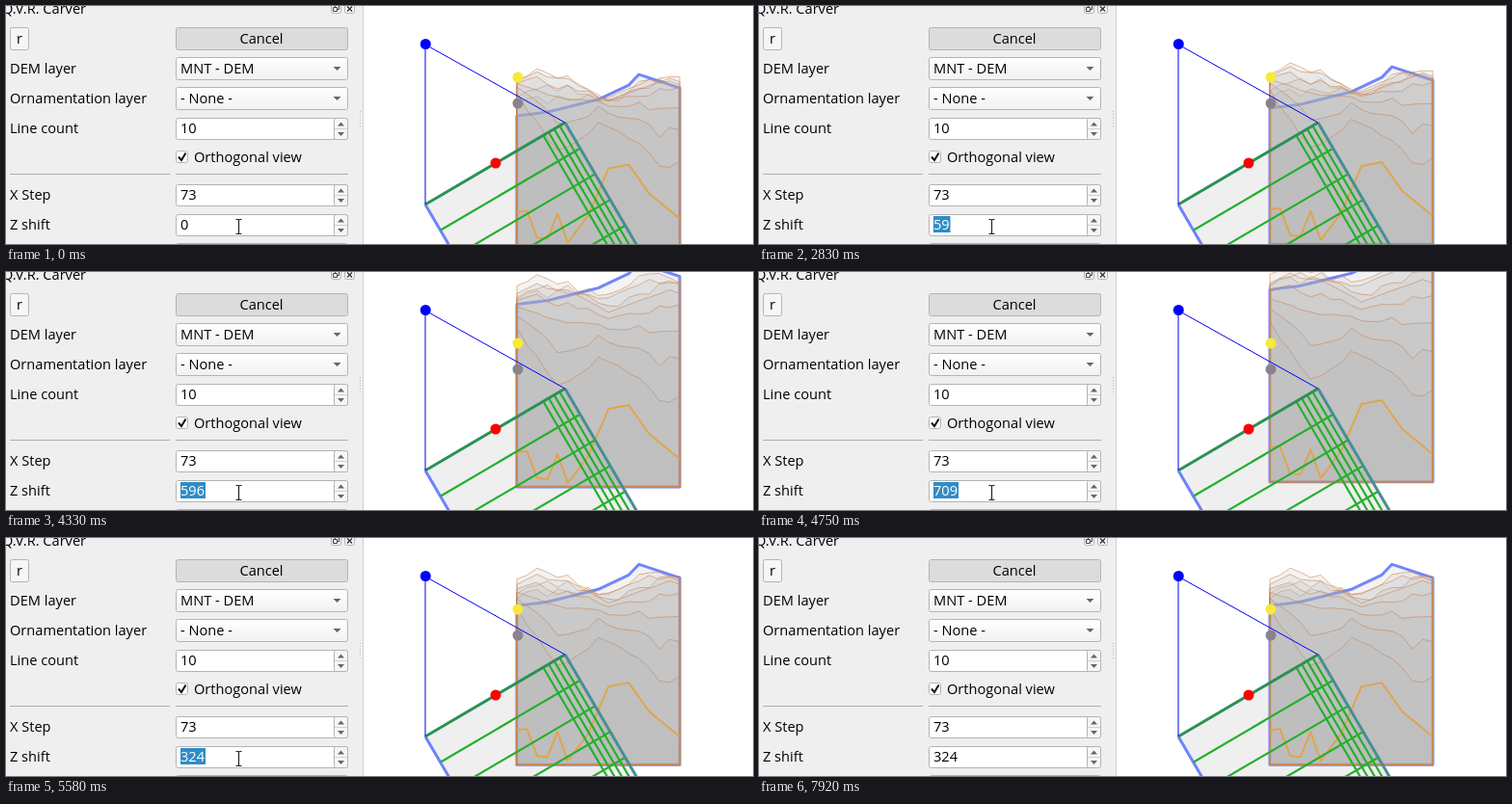
An HTML page for the animation above (8000 ms loop, 775 by 247 pixels).

```html
<!DOCTYPE html>
<html lang="en">
<head>
<meta charset="utf-8">
<title>Terrain profile panel</title>
<style>
html, body { margin: 0; width: 100%; height: 100%; overflow: hidden; background: #fff; }
svg { display: block; width: 775px; height: 247px; }
text { font: 14.6px "Open Sans", "Noto Sans", sans-serif; fill: #000; white-space: pre; }
.box { fill: #fff; stroke: #b4b4b4; }
.btn { fill: #f6f6f6; stroke: #b4b4b4; }
.rule { stroke: #adadad; fill: none; }
.tri { fill: #666; }
.profile { fill: rgba(177,177,177,.15); stroke: rgba(200,128,78,.55); stroke-linejoin: round; }
.green { stroke: #24b02c; stroke-width: 2.2; fill: none; }
.blue { stroke: #6e82ff; stroke-width: 3; fill: none; stroke-linejoin: round; }
.thin { stroke: #0000f5; stroke-width: 1; fill: none; }
</style>
</head>
<body>
<svg id="stage" viewBox="0 0 775 247">
  <defs><linearGradient id="face" x2="0" y2="1">
    <stop stop-color="#fff"/><stop offset="1" stop-color="#f1f1f1"/>
  </linearGradient></defs>
  <g id="map"></g>
  <g id="panel"></g>
</svg>
<script>
const LOOP = 8000;
const map = document.getElementById('map');
const panel = document.getElementById('panel');

function add(parent, tag, attrs, text) {
  const el = document.createElementNS('http://www.w3.org/2000/svg', tag);
  for (const k in attrs) el.setAttribute(k, attrs[k]);
  if (text !== undefined) el.textContent = text;
  parent.appendChild(el);
  return el;
}
const path = (parent, d, cls, more) => add(parent, 'path', { d, class: cls, ...more });
const label = (x, y, s, more) => add(panel, 'text', { x, y, ...more }, s);
const rect = (x, y, width, height, cls, more) =>
  add(panel, 'rect', { x, y, width, height, class: cls, rx: 2, ...more });

// Linear interpolation through [position, value] keys
function sample(keys, x) {
  const i = Math.max(1, keys.findIndex(k => k[0] >= x));
  const [x0, y0] = keys[i - 1], [x1, y1] = keys[i];
  return y0 + (y1 - y0) * (x - x0) / (x1 - x0);
}

let seed = 7;
const noise = amp => {
  seed = seed * 16807 % 2147483647;
  return (seed / 2147483647 * 2 - 1) * amp;
};

// Terrain: four key contours at shift REF, the rest blended between them
const REF = 282, CELLS = 16, LEFT = 530, RIGHT = 699;
const far = [[0, 76], [3, 72], [8, 59], [11, 44], [12, 33], [16, 47]];
const ridge = [[0, 51], [2, 39], [3, 44], [5, 45], [9, 70], [15, 44], [16, 48]];
const low = [[0, 78], [4, 132], [5, 134], [8, 104], [12, 124], [14, 152], [16, 147]];
const near = [[0, 201], [1, 200], [2, 228], [3, 229], [4, 203], [5, 233],
  [7, 205], [9, 156], [11, 152], [13, 182], [16, 208]];

function contour(depth) {
  const blend = (a, b, t, amp) => i => sample(a, i) * (1 - t) + sample(b, i) * t + noise(amp);
  const height =
    depth === 0 ? blend(near, near, 0, 0) :
    depth <= 6 ? blend(ridge, low, ((6 - depth) / 5) ** 2, depth % 5 && 4) :
    blend(ridge, far, (depth - 6) / 3, depth < 9 ? 4 : 0);
  return Array.from({ length: CELLS + 1 }, (_, i) => height(i));
}
const rows = Array.from({ length: 10 }, (_, d) => contour(d));

const rise = (depth, z) => (.0445 + depth * .01005) * (REF - z);
const baseY = z => 250 - .0455 * z;
const line = (depth, z) => 'M' + rows[depth].map((y, i) =>
  (LEFT + i * (RIGHT - LEFT) / CELLS).toFixed(2) + ' ' + (y + rise(depth, z)).toFixed(2)).join('L');
const closed = (depth, z) => `${line(depth, z)}V${baseY(z)}H${LEFT}Z`;

path(map, 'M435 206L580 121L666 268L521 353Z', '', { fill: '#efefef' });
const back = path(map, '', 'blue');
const profiles = [];
for (let d = 9; d >= 0; d--) profiles[d] = path(map, '', 'profile');
profiles[9].style.stroke = 'none';
const frame = path(map, '', '', { fill: 'none', stroke: '#c88a58', 'stroke-width': 2, 'stroke-opacity': .65 });
const front = path(map, '', '', {
  fill: 'none', stroke: '#e6a440', 'stroke-width': 2, 'stroke-opacity': .85, 'stroke-linejoin': 'round'
});

// Slicing area
path(map, 'M435 206L521 353', 'blue');
for (let k = 1; k < 5; k++)
  path(map, `M${435 + 15.6 * k} ${206 + 26.7 * k}l145 -85`, 'green');
for (let k = 1; k < 5; k++) {
  const t = 1 - .039 * k;
  path(map, `M${435 + 145 * t} ${206 - 85 * t}l86 147`, 'green');
}
path(map, 'M580 121l86 147', '', { stroke: '#468f92', 'stroke-width': 3 });
path(map, 'M435 206L580 121', '', { stroke: '#2b9155', 'stroke-width': 3 });
path(map, 'M435 206V40L580 121', 'thin');
for (const [cx, cy, fill] of [[435.3, 39.5, '#00f'], [508, 163, '#f00'], [531, 74, '#f8e936'], [531, 101, '#89838e']])
  add(map, 'circle', { cx, cy, r: 5.5, fill });

// Settings panel
rect(0, 0, 370, 247, '', { fill: '#efefef', rx: 0 });
path(panel, 'M370.5 0V247', '', { stroke: '#d0d0d0' });
for (let y = 109; y < 126; y += 3) rect(367, y, 1, 1, '', { fill: '#b8b8b8', rx: 0 });

label(-4, 7.5, 'Q.V.R. Carver');
for (const x of [337.5, 351.5]) rect(x, -3.5, 10, 11, 'btn');
path(panel, 'M341.5 1.5V-1H345.5V3.5H343.5M339.5 1.5H343.5V5.5H339.5Z', '', { fill: 'none', stroke: '#444' });
path(panel, 'M354 .5L359 5.5M359 .5L354 5.5', '', { stroke: '#333', 'stroke-width': 1.4 });

rect(4.5, 22.5, 19, 23, 'btn');
label(14, 39, 'r', { 'text-anchor': 'middle' });
rect(176.5, 22.5, 178, 23, 'btn', { style: 'fill:#dcdcdc' });
label(265, 39, 'Cancel', { 'text-anchor': 'middle' });

function combo(y, name, value) {
  label(4, y + 17, name);
  rect(176.5, y + .5, 178, 23, 'btn', { style: 'fill:url(#face)' });
  label(181, y + 17, value);
  path(panel, `M339.5 ${y + 10}h8l-4 4z`, 'tri');
}
function spin(y, name, value) {
  label(4, y + 16, name);
  rect(176.5, y + .5, 178, 22, 'box');
  rect(340.5, y + .5, 14, 22, 'btn');
  path(panel, `M341 ${y + 11.5}h13`, 'rule', { 'stroke-opacity': .5 });
  path(panel, `M344 ${y + 8.5}h7l-3.5 -4zM344 ${y + 15}h7l-3.5 4z`, 'tri');
  if (value) label(181, y + 16, value);
}
combo(53, 'DEM layer', 'MNT - DEM');
combo(84, 'Ornamentation layer', '- None -');
spin(116, 'Line count', '10');
rect(176.5, 150.5, 12, 12, 'box');
path(panel, 'M179 156.5l3 3.5l4.5 -7.5', '', { fill: 'none', stroke: '#111', 'stroke-width': 2 });
label(195, 162, 'Orthogonal view');
path(panel, 'M4 174.5H170M176 174.5H355', 'rule');
spin(185, 'X Step', '73');
spin(216, 'Z shift');
const mark = rect(181, 218, 9, 17, '', { fill: '#308cc6', rx: 0 });
const digits = label(181, 232, '0');
rect(176.5, 246.5, 178, 22, 'box');

const beamShape = 'M-3 -7.5H-1Q0 -7.5 0 -6V6Q0 7.5 -1 7.5H-3M3 -7.5H1Q0 -7.5 0 -6M0 6Q0 7.5 1 7.5H3';
const beam = add(panel, 'g', { transform: 'translate(241.5 229)' });
path(beam, beamShape, '', { fill: 'none', stroke: '#fff', 'stroke-width': 3 });
path(beam, beamShape, '', { fill: 'none', stroke: '#222', 'stroke-width': 1.2 });
const arrow = path(panel, 'M0 0V15L3.5 11.7L6 17L8.4 16L6 10.8H11Z', '', { fill: '#111', stroke: '#fff' });

// Twelve ticks a second; '#' marks a tick on which the value is refreshed
const FIRST = 18, LEAVE = 76, GONE = 85, DESELECT = 95;
const rhythm = '#####...#..##.###.##.###.###......####.##.########';
const shiftKeys = [[18, 1], [30, 26], [34, 59], [43, 282], [45, 437], [57, 709], [58, 716], [67, 324]];

function shiftAt(tick) {
  if (tick < FIRST) return 0;
  let i = Math.min(tick - FIRST, rhythm.length - 1);
  while (rhythm[i] !== '#') i--;
  return Math.round(sample(shiftKeys, FIRST + i));
}

let shown = -1;
function setShift(z) {
  if (z === shown) return;
  shown = z;
  back.setAttribute('d', closed(9, z));
  profiles.forEach((p, d) => p.setAttribute('d', closed(d, z)));
  front.setAttribute('d', line(0, z));
  const top = i => rows[9][i] + rise(9, z);
  frame.setAttribute('d', `M${LEFT} ${top(0)}V${baseY(z)}H${RIGHT}V${top(CELLS)}`);
  digits.textContent = z;
  mark.setAttribute('width', 8.5 * String(z).length + .5);
}

const show = (el, on) => { el.style.display = on ? '' : 'none'; };

function draw(t) {
  const tick = Math.floor(t * .012 + .05);
  setShift(shiftAt(tick));

  const selected = tick >= FIRST && tick < DESELECT;
  show(mark, selected);
  digits.style.fill = selected ? '#fff' : '';

  const moving = tick >= LEAVE && tick < GONE;
  show(beam, tick < LEAVE);
  show(arrow, moving);
  if (moving) {
    const u = (tick - LEAVE + 1) / (GONE - LEAVE);
    const e = u * u * (3 - 2 * u);
    arrow.setAttribute('transform', `translate(${241 + 95 * e} ${224 - 180 * e})`);
  }
}

const start = performance.now();
function loop() {
  draw((performance.now() - start) % LOOP);
  requestAnimationFrame(loop);
}
draw(0);
requestAnimationFrame(loop);
</script>
</body>
</html>
```
